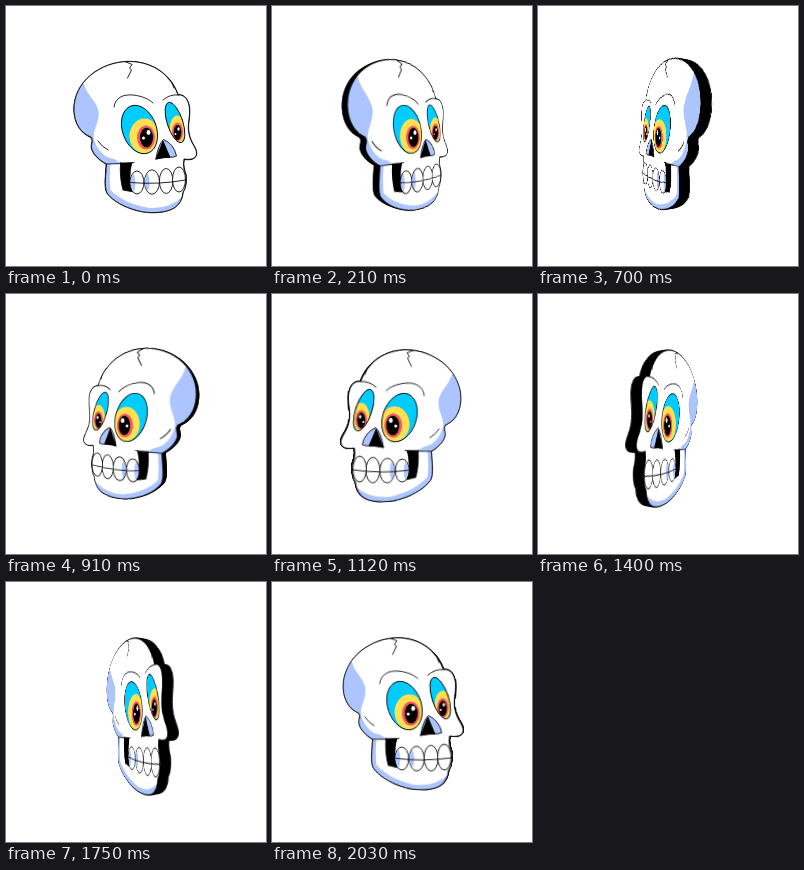
An HTML page for the animation above (2100 ms loop, 260 by 260 pixels).

```html
<!DOCTYPE html>
<html lang="en">
<head>
<meta charset="utf-8">
<title>Spinning skull</title>
<style>
  html, body { margin: 0; width: 100%; height: 100%; overflow: hidden; background: #fff; }
  #stage { position: relative; width: 260px; height: 260px; perspective: 250px; overflow: hidden; }
  #plate { position: absolute; inset: 0; transform-style: preserve-3d; }
  #plate svg { position: absolute; left: 0; top: 0; width: 260px; height: 260px; }
</style>
</head>
<body>
<div id="stage"><div id="plate"></div></div>

<svg width="0" height="0" style="position:absolute">
  <defs>
    <path id="outline" d="M122 55.500C143 55 164 66 172 89C179 88 183 95 183.500 103C184 112 181 119 183 128C185 138 191 142 190.500 148C190 153 184 154 178 153Q177 158 178 163Q181 169 180 177Q179 184 177 186Q176 197 168 202C160 207 143 208 131 204.500C118 201 107 195 101 187C98 180 100 169 100.500 158C93 154 87 148 85.500 142C85 137 88 135 85 131C75 127 68.500 118 68 104C67.500 76 94 56 122 55.500Z"/>
    <clipPath id="inside"><use href="#outline"/></clipPath>
    <ellipse id="ovalL" cx="133.500" cy="123.500" rx="17" ry="25" transform="rotate(-20 133.500 123.500)"/>
    <ellipse id="ovalR" cx="169" cy="116.500" rx="7.800" ry="21" transform="rotate(-18 169 116.500)"/>
    <clipPath id="eyeL"><use href="#ovalL"/></clipPath>
    <clipPath id="eyeR"><use href="#ovalR"/></clipPath>

    <g id="face" fill="none" stroke="#000" stroke-width=".85" stroke-linecap="round" stroke-linejoin="round">
      <use href="#outline" fill="#fff" stroke="none"/>
      <g clip-path="url(#inside)" fill="#adc5ff" stroke="none">
        <path d="M60 76L78 78C80 88 90 94 92.500 105C94 117 86 124 88 134C92 145 99 152 108 153L117 158H98L60 140Z"/>
        <path d="M97 158H104.500Q103 172 104.500 184C113 193 128 200 144 202Q164 203 177 190V212H95Z"/>
      </g>

      <!-- eyes -->
      <g stroke="none" clip-path="url(#eyeL)">
        <path fill="#00ccff" d="M110 94h50v60h-50z"/>
        <ellipse cx="138.500" cy="130" rx="15" ry="17.500" fill="#ffe050"/>
        <ellipse cx="140" cy="131.500" rx="9" ry="12" fill="#f4565f"/>
        <ellipse cx="140.500" cy="131.500" rx="6.500" ry="9.800" fill="#000"/>
        <ellipse cx="142.500" cy="126.500" rx="2" ry="2.400" fill="#fff"/>
        <circle cx="137.500" cy="132" r="1.500" fill="#fff"/>
      </g>
      <g stroke="none" clip-path="url(#eyeR)">
        <path fill="#00ccff" d="M150 92h34v50h-34z"/>
        <ellipse cx="171.500" cy="123.500" rx="8" ry="14" fill="#ffe050"/>
        <ellipse cx="171.500" cy="126" rx="5.500" ry="9.500" fill="#f4565f"/>
        <ellipse cx="171.500" cy="126.500" rx="3.800" ry="7.500" fill="#000"/>
        <ellipse cx="172.500" cy="123" rx="1.200" ry="1.800" fill="#fff"/>
        <circle cx="169.500" cy="128" r="1" fill="#fff"/>
      </g>
      <use href="#ovalL"/>
      <use href="#ovalR"/>

      <!-- brows, cracks and cheek -->
      <path d="M108 101C109 92 117 88 127 89C136 90 143 93 147 97M157 94Q164 88 172 89"/>
      <path d="M119 55.500L126 58.500L123.500 62L125.500 64L121.500 72M161 71Q167 76 168 82"/>
      <path d="M92 135Q96 141 102 144"/>

      <!-- nose -->
      <path fill="#adc5ff" d="M150 152.500Q152 139 157.500 133.500Q168 138 170.500 150Q167 152 163 151Z"/>
      <path fill="#000" d="M150 153L157 135L164 151.500Q157 151 150 153Z"/>

      <!-- mouth -->
      <path fill="#000" d="M114.500 157H126Q123.500 163 124 176Q125 183 128 186L117 184Q113.500 172 114.500 157Z"/>
      <path d="M100.500 158Q114 158 128 156.500"/>
      <g fill="#fff">
        <ellipse cx="131" cy="176.500" rx="7" ry="11.500"/>
        <ellipse cx="146" cy="176" rx="7.500" ry="12.200"/>
        <ellipse cx="160.200" cy="175" rx="6.800" ry="12.500"/>
        <ellipse cx="173" cy="173.500" rx="6.500" ry="12.500"/>
      </g>
      <g fill="#adc5ff" stroke="none">
        <path d="M127.500 167Q131 177 128 186Q121 177 127.500 167Z"/>
        <path d="M142 167Q145 177 142 185Q135 176 142 167Z"/>
      </g>
      <path d="M124 176.500Q152 179 179.500 174"/>
      <use href="#outline"/>
    </g>
    <use id="core" href="#outline" stroke="#000" stroke-width=".5"/>
  </defs>
</svg>

<script>
const HALF = 5.5, STEP = 0.5, FRAME = 70, COUNT = 30;
const plate = document.getElementById('plate');

// Coordinates are drawn as seen at the front, so undo the perspective gain there.
function addLayer(id, z) {
  plate.insertAdjacentHTML('beforeend',
    `<svg viewBox="0 0 260 260" style="transform:translateZ(${z}px) scale(${1 - HALF / 250})"><use href="#${id}"/></svg>`);
}

addLayer('face', -HALF);
for (let z = -HALF + STEP; z < HALF; z += STEP) addLayer('core', z);
addLayer('face', HALF);

function draw() {
  const frame = Math.floor(performance.now() / FRAME) % COUNT;
  plate.style.transform = `rotateY(${frame * 360 / COUNT}deg)`;
  requestAnimationFrame(draw);
}
draw();
</script>
</body>
</html>
```
